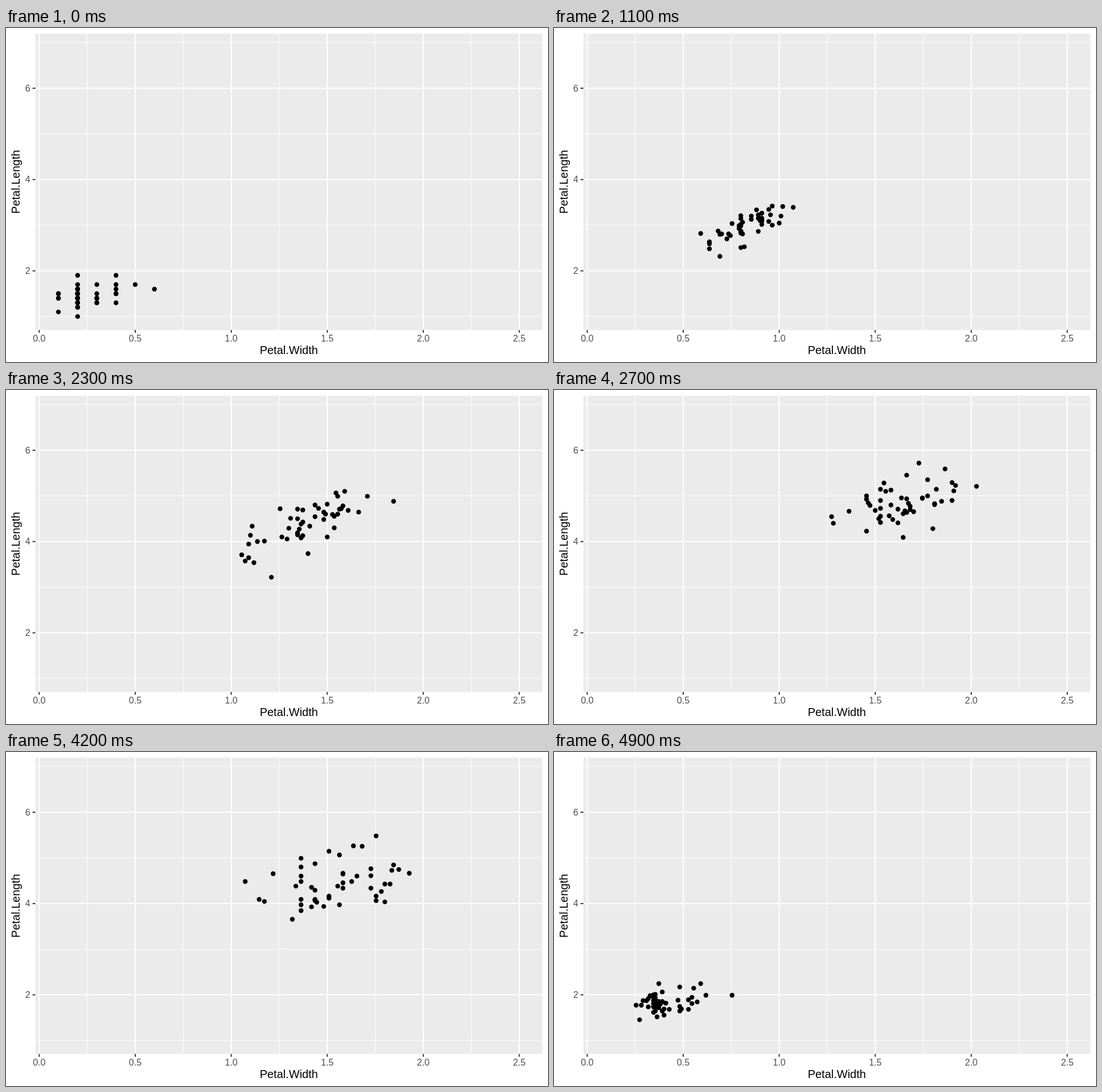
An HTML page that plays this animation: 952x588 px, repeating every 5000 ms.

```html
<!DOCTYPE html>
<html lang="en">
<head>
<meta charset="utf-8">
<title>Petal scatter plot</title>
<style>
  html, body { margin: 0; width: 100%; height: 100%; overflow: hidden; background: #fff; }
  svg { display: block; font-family: "Liberation Sans", Arial, sans-serif; }
  .panel { fill: #ebebeb; }
  .minor { stroke: #fff; stroke-width: .97; }
  .major { stroke: #fff; stroke-width: 1.94; }
  .tick { stroke: #333; stroke-width: 1.94; }
  .label { font-size: 16px; fill: #4d4d4d; }
  .title { font-size: 20px; text-anchor: middle; }
</style>
</head>
<body>
<svg id="plot" width="952" height="588" viewBox="0 0 952 588"></svg>
<script>
const plot = document.getElementById('plot');
const left = 51.6, right = 942, top_ = 10, bottom = 531.6;
const x = v => left + (v + 0.02) / 2.64 * (right - left);
const y = v => bottom - (v - 0.705) / 6.49 * (bottom - top_);

// One flower per number: petal length, then width, two digits each, in tenths.
const setosa = [
  1402, 1402, 1302, 1502, 1402, 1704, 1403, 1502, 1402, 1501,
  1502, 1602, 1401, 1101, 1202, 1504, 1304, 1403, 1703, 1503,
  1702, 1504, 1002, 1705, 1902, 1602, 1604, 1502, 1402, 1602,
  1602, 1504, 1501, 1402, 1502, 1202, 1302, 1401, 1302, 1502,
  1303, 1303, 1302, 1606, 1904, 1403, 1602, 1402, 1502, 1402];
const versicolor = [
  4714, 4515, 4915, 4013, 4615, 4513, 4716, 3310, 4613, 3914,
  3510, 4215, 4010, 4714, 3613, 4414, 4515, 4110, 4515, 3911,
  4818, 4013, 4915, 4712, 4313, 4414, 4814, 5017, 4515, 3510,
  3811, 3710, 3912, 5116, 4515, 4516, 4715, 4413, 4113, 4013,
  4412, 4614, 4012, 3310, 4213, 4212, 4213, 4313, 3011, 4113];
const virginica = [
  6025, 5119, 5921, 5618, 5822, 6621, 4517, 6318, 5818, 6125,
  5120, 5319, 5521, 5020, 5124, 5323, 5518, 6722, 6923, 5015,
  5723, 4920, 6720, 4918, 5721, 6018, 4818, 4918, 5621, 5816,
  6119, 6420, 5622, 5115, 5614, 6123, 5624, 5518, 4818, 5421,
  5624, 5123, 5119, 5923, 5725, 5223, 5019, 5220, 5423, 5118];
const species = [setosa, versicolor, virginica].map(list =>
  list.map(n => ({ length: Math.floor(n / 100) / 10, width: n % 100 / 10 })));

function add(tag, attrs, text = '') {
  const el = document.createElementNS('http://www.w3.org/2000/svg', tag);
  for (const name in attrs) el.setAttribute(name, attrs[name]);
  el.textContent = text;
  return plot.appendChild(el);
}
const line = (cls, x1, y1, x2, y2) => add('line', { class: cls, x1, y1, x2, y2 });
const vertical = (cls, v) => line(cls, x(v), top_, x(v), bottom);
const horizontal = (cls, v) => line(cls, left, y(v), right, y(v));

add('rect', { class: 'panel', x: left, y: top_, width: right - left, height: bottom - top_ });
for (let v = 0.25; v < 2.5; v += 0.5) vertical('minor', v);
for (let v = 1; v <= 7; v += 2) horizontal('minor', v);
for (let v = 0; v <= 2.5; v += 0.5) {
  vertical('major', v);
  line('tick', x(v), bottom, x(v), bottom + 5);
  add('text', { class: 'label', x: x(v), y: 552, 'text-anchor': 'middle' }, v.toFixed(1));
}
for (let v = 2; v <= 6; v += 2) {
  horizontal('major', v);
  line('tick', left - 5, y(v), left, y(v));
  add('text', { class: 'label', x: 42.7, y: y(v) + 5.7, 'text-anchor': 'end' }, v);
}
add('text', { class: 'title', x: (left + right) / 2, y: 573.8 }, 'Petal.Width');
add('text', { class: 'title', transform: `translate(24.2 ${(top_ + bottom) / 2}) rotate(-90)` }, 'Petal.Length');

const dots = setosa.map(() => add('circle', { r: 4.2 }));
let shown = -1;

// Each species rests for 6 ticks of 100 ms, then moves linearly to the next in 11.
function draw(now) {
  const tick = Math.floor(now % 5000 / 100);
  if (tick !== shown) {
    shown = tick;
    const stage = Math.floor(tick / 17);
    const share = Math.max(0, tick % 17 - 5) / 11;
    const from = species[stage], to = species[(stage + 1) % 3];
    const mix = (i, key) => from[i][key] + (to[i][key] - from[i][key]) * share;
    dots.forEach((dot, i) => {
      dot.setAttribute('cx', x(mix(i, 'width')));
      dot.setAttribute('cy', y(mix(i, 'length')));
    });
  }
  requestAnimationFrame(() => draw(performance.now()));
}
draw(performance.now());
</script>
</body>
</html>
```
